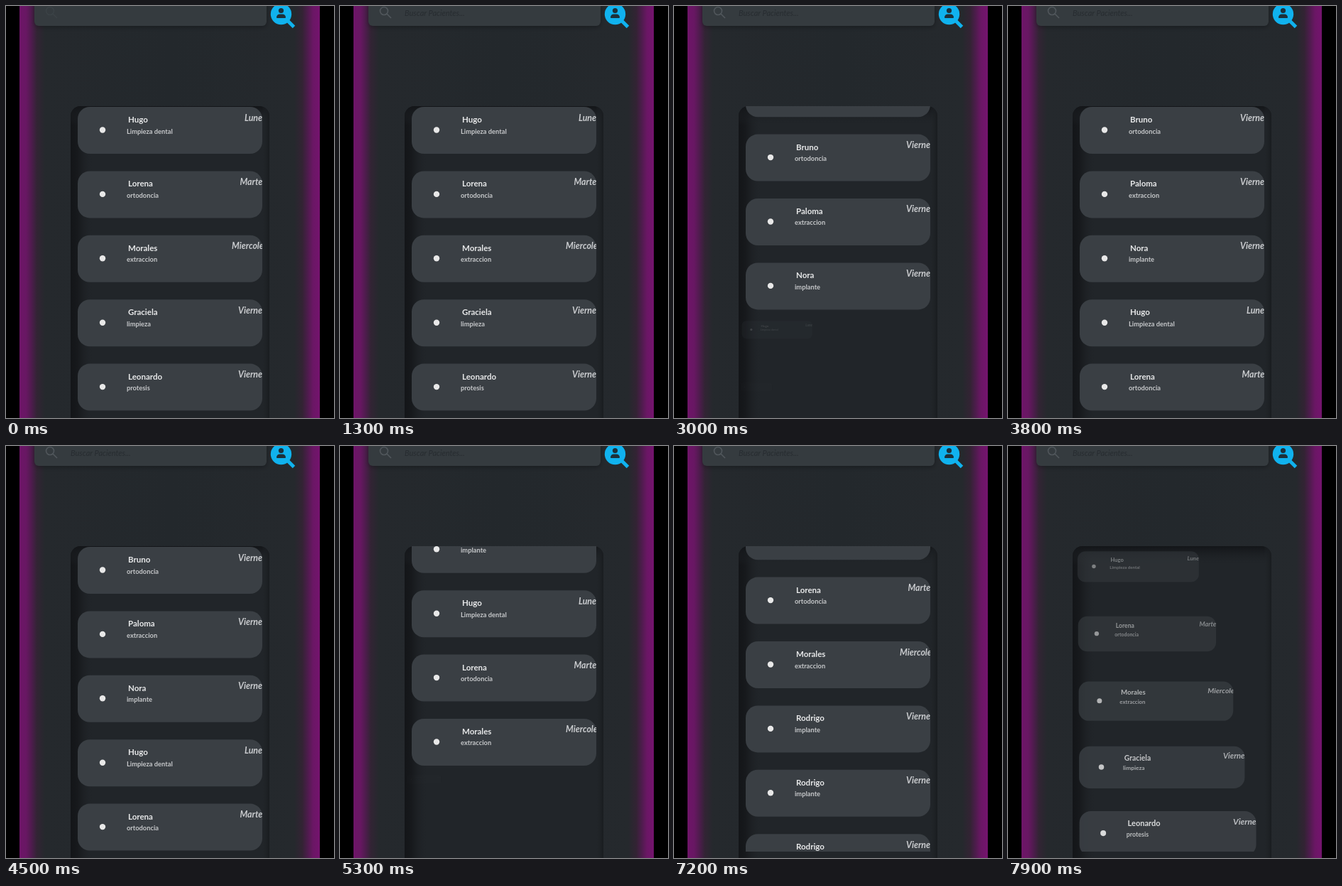
Write an HTML page with a canvas that moves like this. It is 462 by 580 pixels and loops after 8 s.

```html
<!DOCTYPE html>
<html lang="es">
<head>
<meta charset="utf-8">
<style>
html, body { margin: 0; width: 100%; height: 100%; overflow: hidden; background: #000; }
canvas { display: block; }
</style>
</head>
<body>
<canvas id="stage" width="462" height="580"></canvas>
<script>
const ctx = document.getElementById('stage').getContext('2d');
const LOOP = 8000, PITCH = 90.4, FIRST = 142, GROW = 400;
const VIEW = { x: 91, y: 141, r: 371, b: 571 };
const FONT = 'Lato, "Open Sans", sans-serif';

const hugo = ['Hugo', 'Limpieza dental', 'Lunes'];
const lorena = ['Lorena', 'ortodoncia', 'Martes'];
const morales = ['Morales', 'extraccion', 'Miercoles'];
const rodrigo = ['Rodrigo', 'implante', 'Viernes'];
const rows = [
  hugo, lorena, morales,
  ['Graciela', 'limpieza', 'Viernes'],
  ['Leonardo', 'protesis', 'Viernes'],
  ['Bruno', 'ortodoncia', 'Viernes'],
  ['Paloma', 'extraccion', 'Viernes'],
  ['Nora', 'implante', 'Viernes'],
  hugo, lorena, morales, rodrigo, rodrigo, rodrigo, rodrigo
];
const dayX = { Lunes: 336, Martes: 329.5, Miercoles: 318, Viernes: 327 };

// start, end, target offset, ease-out power
const moves = [
  [2000, 2600, 200, 3],
  [2800, 3400, 452, 4.6],
  [4600, 4900, 500, 2],
  [5200, 6000, 771, 6.75],
  [7440, 7518, 438, 1],
  [7518, 7565, 258, 1],
  [7565, 7636, 77, 1],
  [7636, 7700, -11, 1.4]
];

function scrollAt(t) {
  let pos = 0;
  for (const [a, b, to, power] of moves) {
    if (t <= a) break;
    const u = Math.min(1, (t - a) / (b - a));
    pos += (to - pos) * (1 - Math.pow(1 - u, power));
  }
  return pos;
}

const rowY = (i, t) => FIRST + i * PITCH - scrollAt(t);

function inView(i, t) {
  const y = rowY(i, t);
  return y - 14 < VIEW.b && y + 76 > VIEW.y;
}

// times at which each row comes into view
const entries = rows.map((_, i) => {
  const list = [];
  let seen = inView(i, 0);
  if (seen) list.push(-GROW);
  for (let t = 2; t < LOOP; t += 2) {
    const now = inView(i, t);
    if (now && !seen) list.push(t);
    seen = now;
  }
  return list;
});

function growth(i, t) {
  let start = -Infinity;
  for (const e of entries[i]) if (e <= t) start = e;
  return Math.min(1, (t - start) / GROW);
}

function box(x, y, w, h, r) {
  ctx.beginPath();
  ctx.roundRect(x, y, w, h, r);
}

function disc(x, y, r, color) {
  ctx.fillStyle = color;
  ctx.beginPath();
  ctx.arc(x, y, r, 0, Math.PI * 2);
  ctx.fill();
}

function label(str, x, y, font, color) {
  ctx.font = font + ' ' + FONT;
  ctx.fillStyle = color;
  ctx.fillText(str, x, y);
}

function shade(x0, y0, x1, y1, stops) {
  const g = ctx.createLinearGradient(x0, y0, x1, y1);
  stops.forEach(([p, c]) => g.addColorStop(p, c));
  ctx.fillStyle = g;
}

function drawBackdrop() {
  ctx.fillStyle = '#000';
  ctx.fillRect(0, 0, 462, 580);
  shade(19, 0, 442, 0, [
    [0, '#6e1568'], [0.022, '#681763'], [0.04, '#4e1c4d'], [0.058, '#322434'], [0.085, '#25292d'],
    [0.5, '#23282c'],
    [0.915, '#25292d'], [0.942, '#332334'], [0.96, '#4e1c4d'], [0.978, '#6b1665'], [1, '#74146e']
  ]);
  ctx.fillRect(19, 0, 423, 580);
}

function drawSearch(t) {
  ctx.save();
  ctx.shadowColor = 'rgba(0,0,0,0.3)';
  ctx.shadowBlur = 6;
  ctx.shadowOffsetY = 2;
  ctx.fillStyle = '#353b3f';
  box(40, -20, 327, 48, 6);
  ctx.fill();
  ctx.restore();

  ctx.globalAlpha = t < 500 ? 0.25 : 1;
  ctx.strokeStyle = '#51575c';
  ctx.lineWidth = 1.6;
  ctx.beginPath();
  ctx.arc(62, 7, 5.5, 0, Math.PI * 2);
  ctx.moveTo(66, 11);
  ctx.lineTo(72, 17);
  ctx.stroke();
  if (t >= 500) label('Buscar Pacientes...', 91, 14, 'italic 11px', '#272c30');
  ctx.globalAlpha = 1;

  const cyan = '#10b2ee', dark = '#1d3039';
  ctx.strokeStyle = cyan;
  ctx.lineWidth = 5;
  ctx.beginPath();
  ctx.moveTo(396, 20);
  ctx.lineTo(405.5, 29.5);
  ctx.stroke();
  disc(387.5, 11.5, 14.7, cyan);
  disc(387.5, 6.5, 3.6, dark);
  ctx.beginPath();
  ctx.roundRect(381, 11.5, 13, 5.5, [5, 5, 1, 1]);
  ctx.fill();
}

function drawPanel() {
  ctx.save();
  box(VIEW.x, VIEW.y, VIEW.r - VIEW.x, 470, 14);
  ctx.clip();
  ctx.fillStyle = '#212529';
  ctx.fillRect(VIEW.x, VIEW.y, 280, 440);
  shade(91, 0, 124, 0, [[0, '#131518'], [0.3, 'rgba(21,23,26,0.85)'], [1, 'rgba(33,37,41,0)']]);
  ctx.fillRect(91, 141, 34, 440);
  shade(0, 141, 0, 168, [[0, '#131518'], [1, 'rgba(33,37,41,0)']]);
  ctx.fillRect(91, 141, 280, 28);
  shade(371, 0, 360, 0, [[0, '#191c1f'], [1, 'rgba(33,37,41,0)']]);
  ctx.fillRect(360, 141, 11, 440);
  ctx.restore();
}

function drawRow(i, t) {
  const k = growth(i, t);
  if (k <= 0) return;
  const [name, task, day] = rows[i];
  ctx.save();
  // grows from the row's top left corner
  ctx.translate(92, rowY(i, t) - 14);
  ctx.scale(k, k);
  ctx.translate(-92, 14);
  ctx.globalAlpha = k * k;
  ctx.fillStyle = '#3a3f44';
  box(101, 0, 260, 66, 17);
  ctx.fill();
  disc(136, 32.5, 4.2, '#e8e8e8');
  label(name, 172, 22, 'bold 11.5px', '#e8e9ea');
  label(task, 170, 37.5, 'bold 9.3px', '#c6c8ca');
  ctx.beginPath();
  ctx.rect(101, 0, 260, 66);
  ctx.clip();
  label(day, dayX[day], 19.5, 'italic bold 12.3px', '#cacccf');
  ctx.restore();
}

function draw(t) {
  drawBackdrop();
  drawSearch(t);
  drawPanel();
  ctx.save();
  ctx.beginPath();
  ctx.rect(VIEW.x, VIEW.y, VIEW.r - VIEW.x, VIEW.b - VIEW.y);
  ctx.clip();
  rows.forEach((_, i) => { if (inView(i, t)) drawRow(i, t); });
  ctx.restore();
}

const begin = performance.now();
function tick() {
  draw((performance.now() - begin) % LOOP);
  requestAnimationFrame(tick);
}
tick();
</script>
</body>
</html>
```
